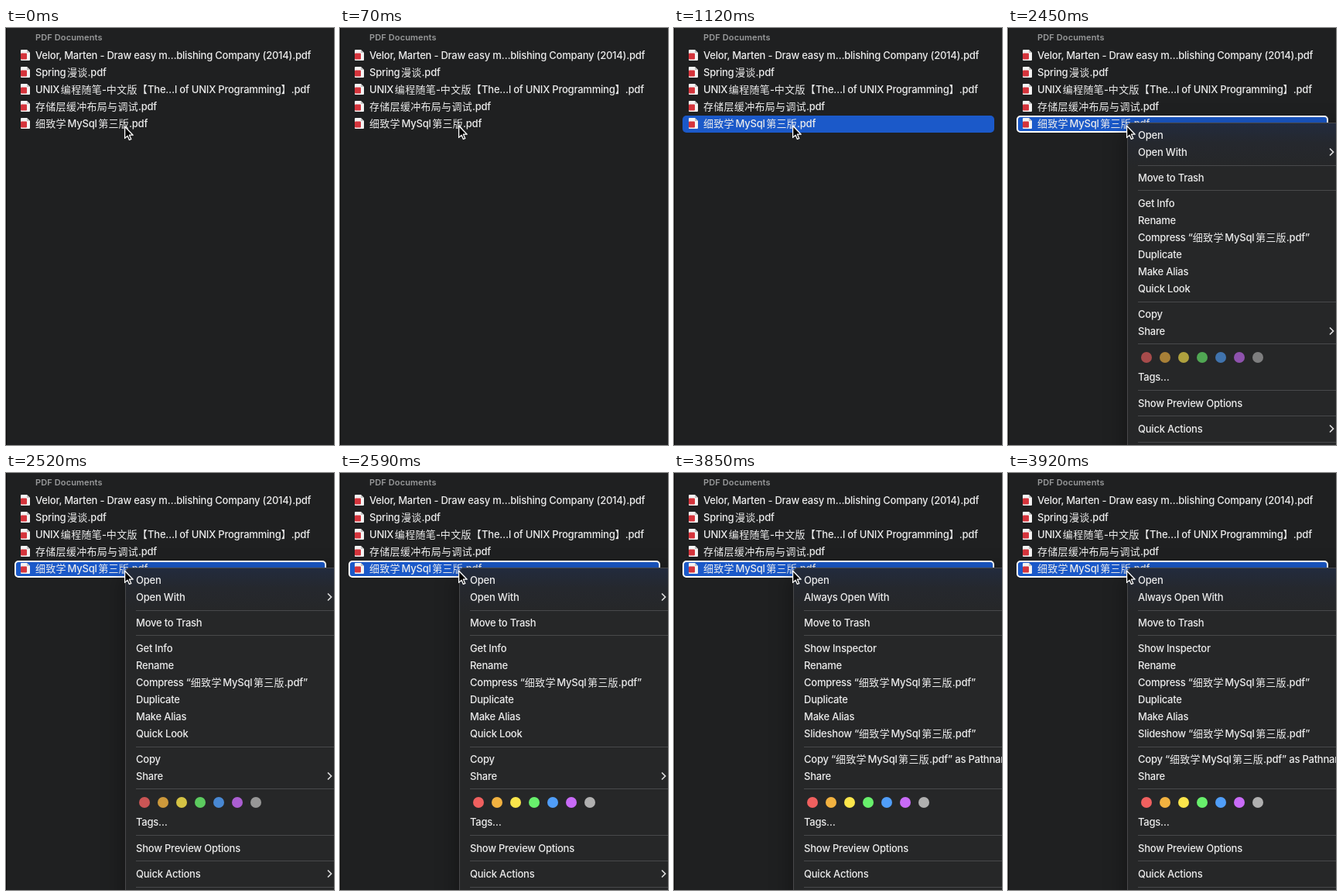
Write an HTML page that moves like this. It is 424 px wide and 538 px high and loops after 6160 ms.

```html
<!DOCTYPE html>
<html lang="zh-CN">
<head>
<meta charset="utf-8">
<title>Context menu</title>
<style>
  html, body { margin: 0; width: 100%; height: 100%; overflow: hidden; background: #1f2021; }
  div, svg { position: absolute; left: 0; top: 0; }
  svg { overflow: visible; }
  #stage {
    width: 424px; height: 538px; overflow: hidden;
    font: 450 13px/22px Inter, "Noto Sans CJK SC", "Noto Sans CJK", sans-serif;
    letter-spacing: -.22px; color: #ececec; white-space: pre;
    text-autospace: no-autospace; text-spacing-trim: space-all;
  }
  .cjk { letter-spacing: .3px; font-weight: 500; }
  .gap { margin-left: 1.6px; }
  #edge { width: 1px; height: 538px; background: #0a0a0a; }
  #head { left: 38px; top: 1px; font-size: 11px; font-weight: 600; letter-spacing: .12px; color: #98999a; }
  #mark { left: 11px; top: 113px; width: 403px; height: 22px; border-radius: 5px; background: #1b59c9; box-sizing: border-box; }
  #mark.ring { border: 2px solid #fff; }
  #menu {
    left: 154px; top: 122px; width: 290px; height: 440px; border-radius: 6px;
    background: linear-gradient(#222b3e, #25282e 26px, #262728 60px);
    box-shadow: inset 0 0 0 1px #48494b, 0 8px 30px rgba(0, 0, 0, .4);
  }
  .line { left: 168px; width: 256px; height: 1px; background: #48494b; }
</style>
</head>
<body>
<div id="stage">
  <div id="edge"></div>
  <div id="head">PDF Documents</div>
  <div id="mark"></div>
  <div id="files"></div>
  <div id="popup">
    <div id="menu"></div>
    <div id="lines"></div>
    <div id="plain"></div>
    <div id="alt"></div>
    <svg width="424" height="538"><g id="tags"></g></svg>
  </div>
  <svg id="cursor" width="424" height="538">
    <path transform="translate(153.6 126.2)" d="M0 0V15.2L3.5 11.9L5.8 17.2L8.2 16.2L5.9 11H10.6Z"
      fill="#000" stroke="#fff" stroke-width="1.3" stroke-linejoin="round"/>
  </svg>
</div>
<script>
const LOOP = 6160, FRAME = 70, SELECT = 1120, OPEN = 2450, ALT = 3850;
const $ = id => document.getElementById(id);
const book = '细致学MySql第三版.pdf';
const files = [
  'Velor, Marten - Draw easy m…blishing Company (2014).pdf',
  'Spring漫谈.pdf',
  'UNIX编程随笔-中文版【The…l of UNIX Programming】.pdf',
  '存储层缓冲布局与调试.pdf',
  book
];
// top, label, label with the modifier key held, has submenu
const items = [
  [127, 'Open'],
  [149, 'Open With', 'Always Open With', true],
  [182, 'Move to Trash'],
  [215, 'Get Info', 'Show Inspector'],
  [237, 'Rename'],
  [259, `Compress “${book}”`],
  [281, 'Duplicate'],
  [303, 'Make Alias'],
  [325, 'Quick Look', `Slideshow “${book}”`],
  [358, 'Copy', `Copy “${book}” as Pathname`],
  [380, 'Share', 'Share', true],
  [439, 'Tags…'],
  [473, 'Show Preview Options'],
  [506, 'Quick Actions', 'Quick Actions', true]
];
const lines = [177, 209, 353, 407, 467, 500, 534];
const colors = ['#f0605f', '#f2b240', '#fce64b', '#68f06c', '#509ef9', '#c96bf8', '#b0b0b0'];

// a small gap where Latin letters meet Chinese ones
const mixed = s => s
  .replace(/(?<=\w)(?=[\u4e00-\u9fff])|(?<=[\u4e00-\u9fff])(?=\w)/g, '<i class="gap"></i>')
  .replace(/[\u3000-\u9fff]+/g, '<span class="cjk">$&</span>');

const label = (x, y, s) => `<div style="left:${x}px;top:${y}px">${mixed(s)}</div>`;

const icon = y => `<svg width="32" height="16" style="top:${y}px">
  <path d="M20 0H27L31 4V13Q31 14 30 14H20Q19 14 19 13V1Q19 0 20 0Z" fill="#f4f4f4"/>
  <path d="M27 0V4H31Z" fill="#c4c4c4"/>
  <rect x="19" y="4.5" width="8" height="8" rx="1" fill="#d5343c"/></svg>`;

const chevron = y => `<svg width="424" height="22" style="top:${y}px">
  <path d="M416 6.5l4.5 4.5l-4.5 4.5" fill="none" stroke="#dedede" stroke-width="1.7"/></svg>`;

$('files').innerHTML = files.map((s, i) => icon(28 + 22 * i) + label(38, 24 + 22 * i, s)).join('');
$('lines').innerHTML = lines.map(y => `<div class="line" style="top:${y}px"></div>`).join('');
$('plain').innerHTML = items.map(([y, s, , sub]) => label(168, y, s) + (sub ? chevron(y) : '')).join('');
$('alt').innerHTML = items.map(([y, s, other = s]) => label(168, y, other)).join('');
$('tags').innerHTML = colors.map((c, i) => `<circle cx="${179 + 24 * i}" cy="425" r="7" fill="${c}"/>`).join('');

const show = (id, on) => $(id).style.display = on ? 'block' : 'none';

function draw() {
  const t = performance.now() % LOOP;
  const fade = Math.min(2, Math.max(0, Math.floor((t - OPEN) / FRAME))) / 2;
  show('mark', t >= SELECT);
  $('mark').className = t >= OPEN ? 'ring' : '';
  show('popup', t >= OPEN);
  show('plain', t < ALT);
  show('alt', t >= ALT);
  $('tags').style.opacity = .64 + .36 * fade;
  $('cursor').style.top = t < FRAME ? '1px' : '0';
  requestAnimationFrame(draw);
}
draw();
</script>
</body>
</html>
```
